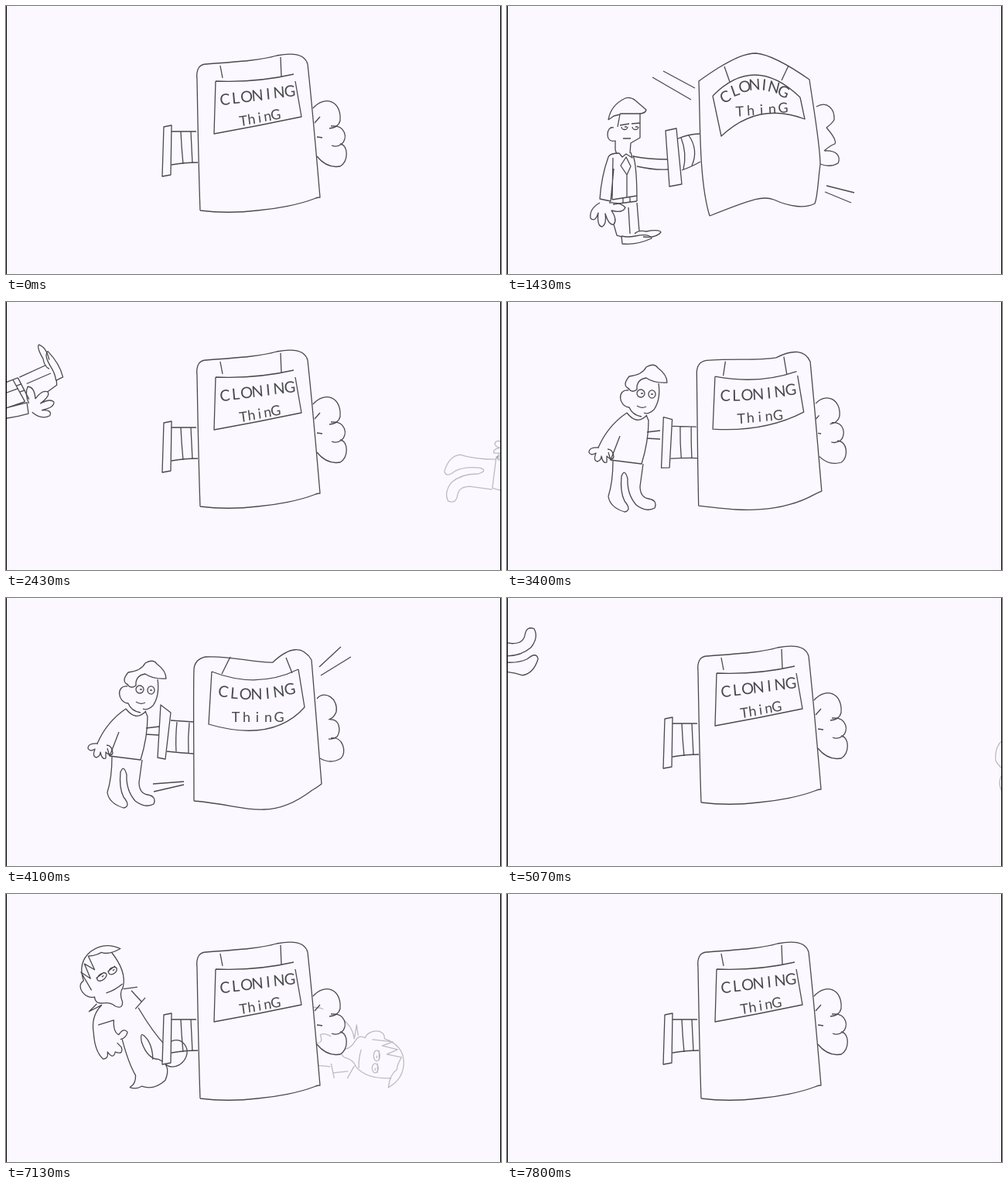
Animation of 640x346 px, one loop 7.96 s. Source, as an HTML page with a canvas:

```html
<!DOCTYPE html>
<html lang="en">
<head>
<meta charset="utf-8">
<title>Cloning thing</title>
<style>
  html, body { margin: 0; width: 100%; height: 100%; overflow: hidden; background: #fbf9ff; }
  canvas { display: block; }
</style>
</head>
<body>
<canvas id="stage" width="640" height="346"></canvas>
<script>
const ctx = document.getElementById('stage').getContext('2d');
const LOOP = 7960, PAPER = '#fbf9ff', INK = '#4a4a4e';

// Each machine part has three matching poses: rest, bulging, sagging.
const machine = [
  // cloud
  ['M397 132 C412 115 434 122 432 148 Q430 157 418 158 M420 155 C440 153 442 172 434 178 Q428 183 421 180 M432 178 C443 180 443 200 432 207 Q415 210 402 194 M406 143 L399 151 M402 169 L409 170',
   'M400 130 C414 122 424 133 423 147 Q420 152 413 157 M413 157 C420 165 426 174 424 178 Q418 180 410 187 M411 187 C426 186 432 194 428 203 Q418 209 405 204 M400 151 L400 151 M402 170 L402 170',
   'M402 130 C412 118 430 130 427 147 Q424 155 417 157 M419 157 C432 156 433 172 428 179 Q423 183 417 182 M420 181 C436 178 441 200 433 207 Q420 215 406 207 M400 151 L400 151 M402 170 L402 170'],
  // pipe
  ['M214 162 Q230 162 246 162 M248 202 Q230 202 214 205 M226 162 Q227 184 229 204 M239 162 Q240 184 241 203',
   'M219 172 Q235 165 249 165 M250 201 Q240 207 226 212 M225 170 Q233 190 228 211 M235 167 Q248 186 239 206',
   'M213 158 Q228 159 243 160 M243 201 Q226 200 208 198 M221 160 Q219 180 220 198 M237 161 Q235 180 236 200'],
  // flange
  ['M204 156 L214 154 L213 218 L202 220 Z',
   'M205 161 L219 158 L226 230 L210 233 Z',
   'M200 138 L213 148 L206 208 L196 206 Z'],
  // body
  ['M251 264 C249 210 248 150 247 95 Q245 76 258 75 C300 72 330 70 350 64 Q385 57 390 75 C396 130 402 200 406 247 C404 247 400 248 398 249 C380 256 350 262 325 264 C300 267 275 267 251 264',
   'M262 271 C248 225 250 150 248 97 Q256 91 273 80 C295 67 308 61 322 61 Q345 63 391 95 C396 130 405 180 405 205 C402 225 402 245 398 255 C385 262 365 259 345 250 C332 245 322 247 262 271',
   'M243 262 C243 200 242 120 243 92 Q244 79 258 76 C290 74 320 84 345 83 Q378 52 395 80 C399 130 405 200 408 240 C404 243 400 246 396 248 C375 264 355 273 333 273 C305 274 290 266 243 262'],
  // sign
  ['M271 97 Q325 99 372 88 M374 97 L382 143 Q325 155 269 165 L271 97 M277 77 L280 93 M355 66 L356 91',
   'M266 116 Q320 61 379 118 M379 118 L385 146 Q325 123 277 168 L266 116 M281 78 L288 98 M364 77 L355 96',
   'M266 95 Q325 118 378 92 M378 92 L386 141 Q345 187 262 163 L266 95 M290 76 L279 98 M362 77 L370 97']
];

// Letter places for the three poses, by letter index.
const words = [
  ['CLONING', 20, [
    i => [283 + 14 * i, 120.5 - 1.8 * i],
    i => [282 + 12.6 * i, 101 + 1.4 * (i - 3.4) ** 2],
    i => [281 + 14.3 * i, 124 - 0.55 * (i - 2.5) ** 2]]],
  ['ThinG', 18, [
    i => [307 + 10.4 * i, 148 - 2 * i],
    i => [301 + 14 * i, 136 - 1.2 * i],
    i => [297 + 14 * i, 154]]]
];

const dashes = {
  up: 'M188 92 L238 121 M202 84 L243 106 M411 240 L445 254 M413 232 L449 241',
  down: 'M405 89 L433 63 M407 100 L446 76 M190 240 L230 237 M191 250 L230 241'
};

const clerk = [
  'M131 147 Q134 128 153 119 Q160 117 166 122 L180 134 Q179 139 170 139 L146 139 M131 147 L138 142 L146 140 L143 156',
  'M138 157 C128 154 126 178 140 174 L140 186 M172 139 L172 170 L160 177 L159 190 M140 186 L142 191',
  'M146 154 L158 152 M161 152 L172 151 M150 171 L160 171',
  'M148 156 a4 3.5 0 1 0 8 0 M162 156 a4 3.5 0 1 0 8 0 M152 156 h3 M166 156 h3',
  'M145 190 L149 195 L154 191 L162 196 L160 189 M154 195 L147 206 L155 218 L160 207 Z M155 218 L155 247',
  'M145 190 Q133 190 131 195 Q122 220 120 249 L134 252 L138 210 M137 196 L136 250 M163 193 Q168 206 168 252',
  'M163 194 Q182 198 208 198 M168 207 Q190 212 208 211',
  'M136 250 L168 245 M137 256 L168 252 M150 248 L150 255 M159 247 L159 254',
  'M120 254 Q106 262 108 274 Q114 280 118 267 Q116 284 123 285 Q129 282 127 268 Q132 284 138 282 Q143 276 135 264 Q150 268 153 260 Q146 253 132 254',
  'M138 282 L142 296 L149 298 M157 260 L159 294 M168 254 L171 291',
  'M148 297 L149 307 Q167 309 187 300 Q184 293 166 297 Q156 299 148 297',
  'M165 294 Q170 289 180 291 Q197 288 199 292 Q193 300 176 298'
];

const boy = [
  'M158 112 Q148 108 158 96 Q175 94 180 84 Q190 78 195 85 Q207 94 207 104 Q190 105 180 98 Q167 100 168 113 Q162 118 157 112',
  'M157 114 C142 112 144 135 158 136 Q162 146 174 148 M196 105 Q199 126 190 139 Q182 146 177 143 M168 134 Q174 138 180 135',
  'M168 118 a5 5 0 1 0 10 0 a5 5 0 1 0 -10 0 M183 119 a4 4.5 0 1 0 9 0 a4 4.5 0 1 0 -9 0 M173 118 h3 M186 119 h3',
  'M155 143 Q168 160 181 146 M155 143 Q130 160 118 188 M180 146 L183 153 Q183 180 174 209 L134 204 L146 173 M134 204 L131 194',
  'M119 188 Q106 187 106 194 Q108 199 115 195 Q111 205 117 206 Q122 204 122 199 Q124 209 129 207 L129 199 Q136 206 138 200 Q137 190 130 190',
  'M181 168 L198 166 M181 176 L198 177',
  'M137 205 Q137 232 131 251 Q133 265 152 271 Q162 269 152 257 Q146 245 148 225 Q152 214 156 228 Q155 248 167 262 Q180 272 191 266 Q195 256 183 254 Q172 252 172 238 L176 209'
];

const teen = [
  'M152 124 Q160 100 182 99 Q204 99 215 119 Q198 117 192 108 Q186 108 176 102 L172 121 L166 107 L161 127 L156 113 L153 140',
  'M152 124 C138 123 140 146 151 149 Q146 157 155 162 Q164 167 165 174 Q170 184 176 176 Q179 164 188 161 Q204 148 203 116',
  'M167 134 a7 4 0 1 0 14 0 a7 4 0 1 0 -14 0 M184 136 a6 4 0 1 0 12 0 a6 4 0 1 0 -12 0 M174 134 h3 M190 136 h3 M167 131 L180 131 M184 133 L196 133 M166 154 Q178 158 190 157',
  'M148 158 L134 160 L152 163 Q132 166 122 186 Q109 206 112 220 Q118 224 122 216 Q122 229 130 222 Q136 232 140 222 L139 214',
  'M133 181 L153 188 Q143 200 147 207 Q158 203 158 211 Q152 216 145 213',
  'M187 163 L203 172 M184 193 L203 189 M194 171 L196 190',
  'M147 214 Q135 244 133 262 Q127 271 118 270 Q122 277 131 278 Q140 292 160 290 Q179 279 169 263 Q158 254 165 232 Q173 216 173 235 Q172 247 163 259 M188 194 Q184 230 187 255 C213 248 216 285 187 285 Q173 283 172 270'
];

const people = {
  clerk: { art: clerk, pivot: [155, 215] },
  boy: { art: boy, pivot: [155, 185] },
  teen: { art: teen, pivot: [160, 195] }
};

// Each act: one person enters, shakes the machine, is flung left while the clone flies out right.
// "out" and "copy" are poses [x, y, degrees] reached at time "mark".
const acts = [
  { who: people.clerk, clone: people.boy, enter: [70, 830], from: [-71, -20], fade: true,
    shake: 880, fling: 2050, mark: 2430, out: [-14, 123, -110], copy: [652, 221, 90] },
  { who: people.boy, clone: people.teen, enter: [2560, 3290], from: [-220, 0],
    shake: 3350, fling: 4600, mark: 5070, out: [-45, 76, -90], copy: [726, 210, 90] },
  { who: people.teen, clone: people.teen, enter: [5600, 6250], from: [-230, 0],
    shake: 6450, fling: 7050, mark: 7380, out: [-20, 70, -115], copy: [690, 225, 90] }
];

const clamp = v => Math.max(0, Math.min(1, v));
const lerp = (a, b, k) => a + (b - a) * k;

function mixPath(a, b, k) {
  const to = b.match(/[\d.]+/g);
  let i = 0;
  return a.replace(/[\d.]+/g, n => lerp(+n, +to[i++], k).toFixed(2));
}

function line(d, fill) {
  const path = new Path2D(d);
  if (fill) ctx.fill(path);
  ctx.stroke(path);
}

function figure({ art, pivot }, x, y, deg, alpha) {
  ctx.save();
  ctx.globalAlpha = alpha;
  ctx.translate(x, y);
  ctx.rotate(deg * Math.PI / 180);
  ctx.translate(-pivot[0], -pivot[1]);
  art.forEach(d => line(d));
  ctx.restore();
}

function drawAct(a, t) {
  const [px, py] = a.who.pivot;
  if (t < a.enter[0]) return;
  if (t < a.fling) {
    const k = clamp((t - a.enter[0]) / (a.enter[1] - a.enter[0]));
    const left = (1 - k) ** 2;
    const hop = a.fade ? 0 : 6 * Math.abs(Math.sin(k * Math.PI * 4));
    figure(a.who, px + a.from[0] * left, py + a.from[1] * left - hop, 0, a.fade ? k : 1);
    return;
  }
  const u = (t - a.fling) / (a.mark - a.fling);
  if (u > 2.2) return;
  const [x, y, deg] = a.out;
  figure(a.who, lerp(px, x, u * u), lerp(py, y, Math.min(u, 1.2)), deg * clamp(u * 1.3), 1);
  const [cx, cy, turn] = a.copy;
  figure(a.clone, lerp(330, cx, u), lerp(185, cy, u), turn, 0.35);
}

function wobble(t) {
  const a = acts.find(a => t > a.shake && t < a.fling);
  if (!a) return 0;
  const ramp = clamp((t - a.shake) / 120) * clamp((a.fling - t) / 120);
  return ramp * Math.cos((t - 1430) / 356 * 2 * Math.PI);
}

function drawMachine(w) {
  const pose = w > 0 ? 1 : 2, k = Math.abs(w);
  ctx.fillStyle = PAPER;
  machine.forEach((p, i) => line(mixPath(p[0], p[pose], k), i < 4));

  ctx.fillStyle = INK;
  ctx.textAlign = 'center';
  ctx.textBaseline = 'alphabetic';
  for (const [word, size, places] of words) {
    ctx.font = `400 ${size}px Lato, "Open Sans", sans-serif`;
    [...word].forEach((ch, i) => {
      const at = j => {
        const [x0, y0] = places[0](j), [x1, y1] = places[pose](j);
        return [lerp(x0, x1, k), lerp(y0, y1, k)];
      };
      const [x, y] = at(i), [ax, ay] = at(i - 0.5), [bx, by] = at(i + 0.5);
      ctx.save();
      ctx.translate(x, y);
      ctx.rotate(Math.atan2(by - ay, bx - ax) * 0.7);
      ctx.fillText(ch, 0, size * 0.36);
      ctx.restore();
    });
  }
  if (k > 0.5) line(w > 0 ? dashes.up : dashes.down);
}

function draw(now) {
  const t = now % LOOP;
  ctx.fillStyle = PAPER;
  ctx.fillRect(0, 0, 640, 346);
  ctx.strokeStyle = INK;
  ctx.lineWidth = 1.3;
  ctx.lineJoin = 'round';
  acts.forEach(a => drawAct(a, t));
  drawMachine(wobble(t));
  ctx.fillStyle = '#000';
  ctx.fillRect(0, 0, 1, 346);
  ctx.fillRect(639, 0, 1, 346);
}

const start = performance.now();
function tick() {
  draw(performance.now() - start);
  requestAnimationFrame(tick);
}
tick();
</script>
</body>
</html>
```
